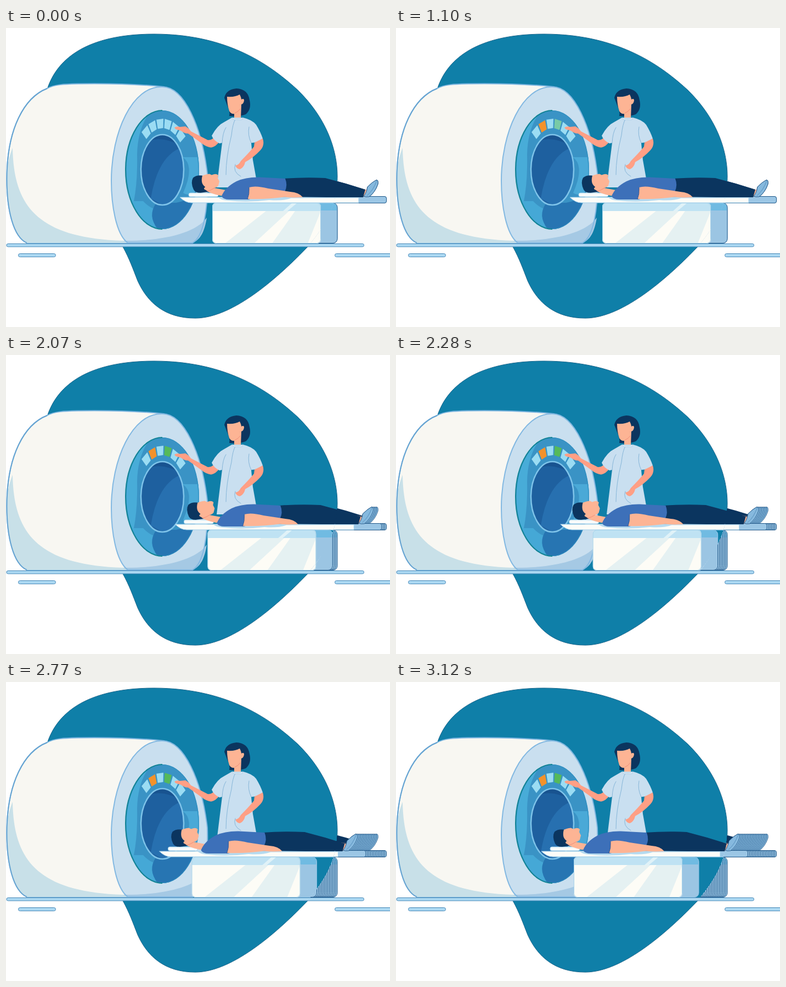
Animation of 700 by 544 pixels, one loop 3.19 s. Source, as an HTML page:

```html
<!DOCTYPE html>
<html lang="en">
<head>
<meta charset="utf-8">
<title>Scanner</title>
<style>
html, body { margin: 0; width: 100%; height: 100%; overflow: hidden; background: #fff; }
svg { display: block; width: 700px; height: 544px; --edge: #8fc3e6; }
#trail { --edge: #1f5687; }
.skin { fill: #fdb494; }
.arm { fill: #ff9f85; }
.navy { fill: #0b355f; }
.coat { fill: #c9dff0; }
.line { fill: none; stroke: #86b6d8; stroke-linecap: round; }
</style>
</head>
<body>
<svg viewBox="0 0 700 544">
<defs>
  <path id="blob" d="M75 112C88 70 130 11 270 11C410 11 488 73 532 113C583 163 604 220 604 270C604 320 585 357 550 398C500 450 415 528 345 528C290 528 258 500 240 460C231 437 225 420 213 398L150 300Z"/>
  <clipPath id="outside">
    <path clip-rule="evenodd" d="M500 0H700V544H500ZM500 85Q517 99 532 113C583 163 604 220 604 270C604 320 585 357 550 398Q527 422 500 447Z"/>
  </clipPath>
  <clipPath id="ringClip"><ellipse cx="285" cy="258" rx="67" ry="108"/></clipPath>
  <clipPath id="holeClip"><ellipse cx="285" cy="258" rx="39" ry="64"/></clipPath>
  <clipPath id="frontClip"><rect x="376" y="318" width="198" height="74" rx="7"/></clipPath>

  <g id="bed">
    <!-- base -->
    <rect x="377" y="318.5" width="227" height="73" rx="8" fill="#9bc5e3" stroke="var(--edge)"/>
    <path d="M560 319H596Q603 319 603 327V332H560Z" fill="#70bbe2"/>
    <g clip-path="url(#frontClip)">
      <path d="M376 318H574V392H376Z" fill="#fdfcf6"/>
      <path d="M474 333H516L452 392H399ZM527 333H574L550 392H485Z" fill="#e5f1f2"/>
      <path d="M376 318H574V333H376Z" fill="#bfe2f3"/>
      <path d="M522 318H531L513 333H505Z" fill="#e0f2f8"/>
    </g>
    <rect x="376.5" y="318.5" width="197" height="73" rx="7" fill="none" stroke="#a8d3ea"/>
    <!-- table -->
    <path d="M600 306.500H690Q693.500 306.500 693.500 310V315Q693.500 318.500 690 318.500H600Z" fill="#9bc6e5" stroke="var(--edge)"/>
    <path d="M317 308H643V318H338Q327 318 317 308Z" fill="#fcfcf8" stroke="#9bcdea"/>
    <path d="M386 307.500H643V309.500H520Q505 315 480 313Q440 318 405 314Q391 313 386 307.500Z" fill="#b6daef"/>
    <rect x="333" y="300" width="54" height="7" rx="3" fill="#f8fbfb" stroke="#9ed0ea"/>
    <!-- patient -->
    <path class="skin" d="M648 292L659 295L657 307L646 306Z"/>
    <path class="navy" d="M505 274Q545 271 582 273Q618 282 655 294L651 308H585L505 307Z"/>
    <path d="M652 306Q657 300 659 289Q668 280 675 276.500Q679 276 678 284Q673 299 662 307Q655 308 652 306Z" fill="#86b9de" stroke="#164a7a" stroke-width=".8"/>
    <path d="M658 305Q670 295 676 277" fill="none" stroke="#3a76a8" stroke-width=".6"/>
    <path class="skin" d="M356 270Q362 266 371 265.500L375 267.500Q383 264 387 268L386 273L389 279L387 287Q383 291 379 291L401 295L397 306Q382 304 368 298L357 294Z"/>
    <path class="navy" d="M358 268.500Q347 267 341 272.500Q336 281 342 294Q346 301 357 299.500L369 298Q361 294 363 289Q354 283 358 268.500Z"/>
    <ellipse class="skin" cx="366" cy="292" rx="5" ry="3"/>
    <path d="M380 291Q374 295 367 297" fill="none" stroke="#f18f7b"/>
    <path d="M393 306Q399 290 420 279Q437 271 462 271.500L509 274Q514 287 508 298L470 304L442 312H407Q396 312 393 306Z" fill="#3d70b9"/>
    <path class="skin" d="M443 290Q455 286 478 292L518 298Q534 299 541 308Q520 309 508 307.500Q476 312 440 311Q444 301 443 290Z"/>
    <path d="M443 290Q444 302 440 312" fill="none" stroke="#2b5796"/>
  </g>
</defs>

<use href="#blob" fill="#0f7fa8" stroke="#1b668c"/>

<!-- machine -->
<path d="M38 391C13 380 1.500 330 1.500 275C1.500 182 34 126 75 110C88 102.500 108 102 130 101.500C190 100.500 240 102 288 107L270 391Z" fill="#f8f7f2" stroke="#79b4df" stroke-width="2"/>
<path d="M12 218C14 315 48 382 213 387L222 391H38C13 380 1.500 330 1.500 275C1.500 252 5 235 12 218Z" fill="#c8e0e8"/>
<path d="M38 391C13 380 1.500 330 1.500 275C1.500 182 34 126 75 110" fill="none" stroke="#67a4d2" stroke-width="2"/>
<path d="M285 107C325 107 357 180 367 265C369 330 360 380 340 391H222C200 375 192 320 192 278C192 190 230 105 285 107Z" fill="#c9dfef"/>
<path d="M213 387C280 388 345 375 366 345C362 370 355 385 340 391H222Z" fill="#a5c9e4"/>
<path d="M285 107C325 107 357 180 367 265C369 330 360 380 340 391H222C200 375 192 320 192 278C192 190 230 105 285 107Z" fill="none" stroke="#82b8e1" stroke-width="2"/>
<g clip-path="url(#ringClip)">
  <path d="M218 150H352V366H218Z" fill="#3a93c5"/>
  <path d="M218 150H265Q240 180 239 230Q240 280 233 315H218Z" fill="#48acd8"/>
  <path d="M218 315H250Q262 328 274 330Q264 347 275 366H218Z" fill="#45a8d6"/>
  <path d="M274 318Q257 342 277 366H352V285Q343 312 310 318Z" fill="#2775b2"/>
  <path d="M322 235Q345 250 323 300Q337 310 352 290V235Z" fill="#4aa9d7"/>
</g>
<ellipse cx="285" cy="258" rx="66" ry="107.500" fill="none" stroke="#2f8fc0"/>
<path d="M285 150C248 150 218 199 218 258C218 317 248 366 285 366" fill="none" stroke="#118395" stroke-width="2"/>
<g clip-path="url(#holeClip)">
  <path d="M246 194H324V322H246Z" fill="#1e609f"/>
  <path d="M246 194H324V216Q285 196 262 205Z" fill="#185390"/>
  <path d="M324 216Q277 230 264 310L285 322H324Z" fill="#2770b0"/>
</g>
<ellipse cx="285" cy="258" rx="39" ry="64" fill="none" stroke="#7fc4ea" stroke-width="2.500"/>
<g id="buttons"></g>

<!-- doctor -->
<path class="navy" d="M398 127Q401 112 420 110Q441 111 444 131Q448 148 437 157Q426 162 407 160Q409 152 403 140Z"/>
<path class="skin" d="M403 125Q418 126 426 121Q429 127 429 130Q434 127 434 132Q433 138 429 139L428 165H416V156Q410 157 407 151Q403 139 403 125Z"/>
<path d="M417 155Q424 152 427 147" fill="none" stroke="#ef8f7a"/>
<path class="arm" d="M307 181Q312 178 317 180L327 179Q333 182 337 188L368 204Q377 204 384 194L390 205Q383 216 374 217.500Q366 217 357 210L332 192Q325 192 319 187L309 184Z"/>
<path class="coat" d="M412 163H432Q449 167 456 176Q464 189 468 201Q458 209 447 209L450 240L459 290H384Q387 265 394 209L389 210Q378 204 375 196Q385 177 398 171Z"/>
<path class="arm" d="M468 201Q472 213 464 222Q451 236 436 244Q434 254 426 257Q420 256 418 250Q424 250 428 242Q442 228 452 216L453 208.500Z"/>
<path class="line" d="M418 166Q413 175 411 195Q401 235 401 267M394 209Q395 190 401 181M447 209Q440 195 443 180M418 248Q413 262 428 270"/>
<path d="M412 163Q422 167 432 163L430 167H415Z" fill="#dcebf6" stroke="#9fc5e0" stroke-width=".6"/>

<use id="current" href="#bed"/>
<g id="trail" clip-path="url(#outside)"></g>

<!-- floor -->
<g fill="#abd8f2" stroke="#4788b8">
  <rect x="1" y="392.500" width="651.500" height="5.500" rx="2.700"/>
  <rect x="22.500" y="410.500" width="68" height="6" rx="3"/>
  <rect x="599.500" y="410.500" width="112" height="6" rx="3"/>
</g>
</svg>
<script>
const LOOP = 3190, STEP = 70, SLIDES = 18, SHIFT = 52 / SLIDES;
const byId = id => document.getElementById(id);

function add(parent, tag, attributes) {
  const node = document.createElementNS("http://www.w3.org/2000/svg", tag);
  for (const name in attributes) node.setAttribute(name, attributes[name]);
  return parent.appendChild(node);
}

const onRing = (rx, ry, degrees) => {
  const angle = degrees * Math.PI / 180;
  return [285 + rx * Math.cos(angle), 258 - ry * Math.sin(angle)];
};

const buttons = Array.from({ length: 6 }, (_, i) => {
  const middle = 126 - 15.7 * i, left = middle + 6.6, right = middle - 6.6;
  const points = [onRing(56, 93, left), onRing(56, 93, right), onRing(43, 76, right), onRing(43, 76, left)];
  return add(byId("buttons"), "polygon", { points: points.join(" "), fill: "#9bdcf3" });
});

const slide = k => `translate(${-k * SHIFT} 0)`;
// Earlier bed positions remain visible outside the blue shape.
const ghosts = Array.from({ length: SLIDES + 1 }, (_, k) =>
  add(byId("trail"), "use", { href: "#bed", transform: slide(k) }));

const stepsSince = (time, start, max) =>
  Math.max(0, Math.min(max, Math.floor((time - start) / STEP) + 1));

function light(button, steps, color) {
  const amount = steps ? 45 + 5.5 * steps : 0;
  button.style.fill = `color-mix(in srgb, ${color} ${amount}%, #9bdcf3)`;
}

function draw() {
  const time = performance.now() % LOOP;
  light(buttons[1], stepsSince(time, 270, 10), "#f3922b");
  light(buttons[3], stepsSince(time, 1100, 10), "#55b95a");
  const moved = stepsSince(time, 1930, SLIDES);
  byId("current").setAttribute("transform", slide(moved));
  ghosts.forEach((ghost, k) => ghost.style.display = k <= moved ? "" : "none");
  requestAnimationFrame(draw);
}
draw();
</script>
</body>
</html>
```
